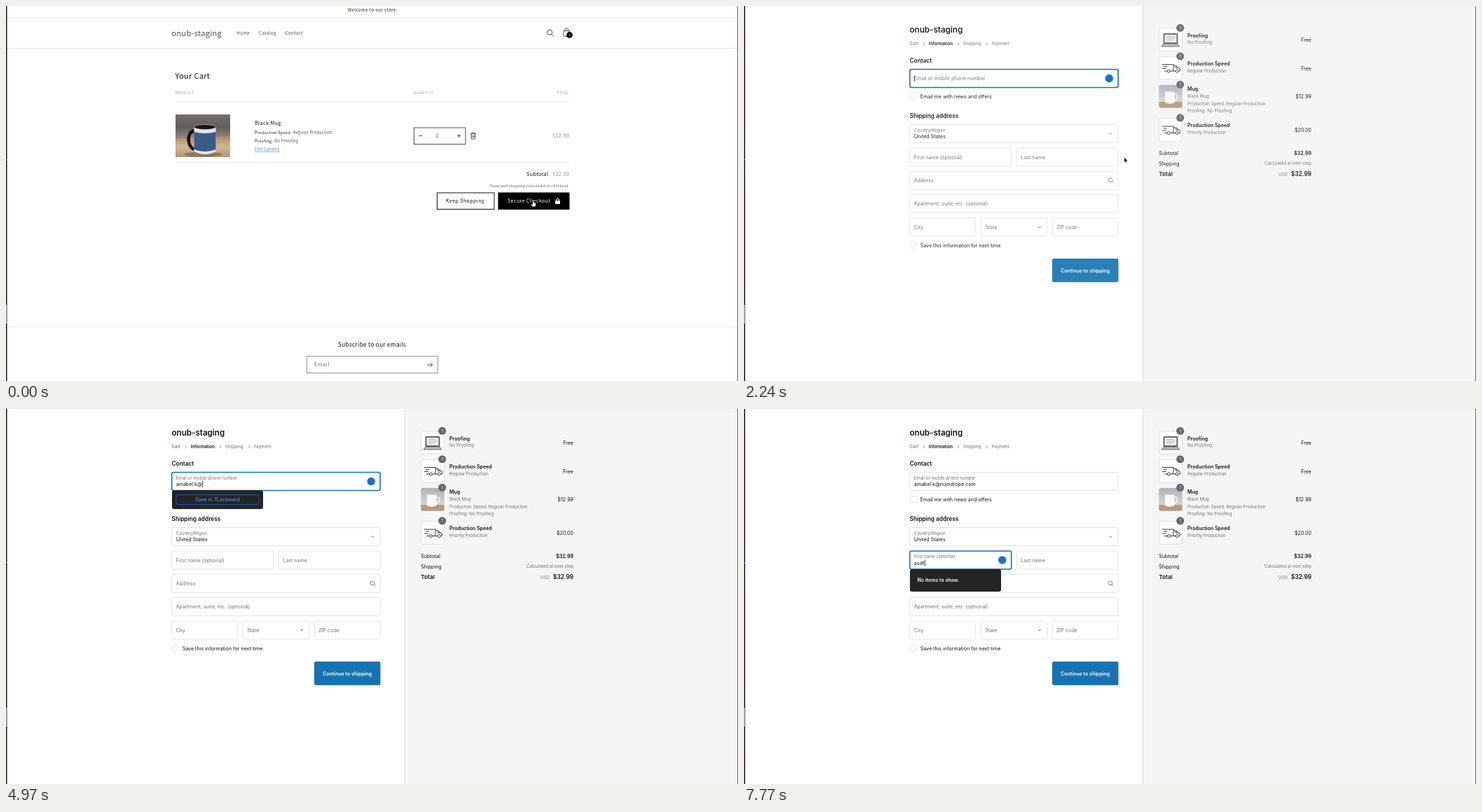
These frames come from a looping animation (1045 px wide and 536 px high, 8000 ms). An HTML page:

```html
<!DOCTYPE html>
<html lang="en">
<head>
<meta charset="utf-8">
<title>Checkout</title>
<style>
  html, body { margin: 0; width: 100%; height: 100%; overflow: hidden; background: #fff; }
  svg { display: block; width: 1045px; height: 536px; }
  text { white-space: pre; }
  #cart { font-family: "Noto Sans CJK JP", "Noto Sans CJK SC", "Noto Sans CJK", "Noto Sans", sans-serif; letter-spacing: .31px; fill: #4d4d4d; }
  #checkout, #popup { font-family: Inter, Roboto, sans-serif; fill: #111; }
  .b { font-weight: 600; }
  .dark { fill: #121212; }
  .grey { fill: #707070; }
  .pale { fill: #8f8f8f; }
  .white { fill: #fff; }
  .link { fill: #1773b0; }
  .button { letter-spacing: .51px; }
  .caps { letter-spacing: .66px; }
  .line { fill: none; stroke: #222; stroke-width: .8; }
  .rule { fill: none; stroke: #e9e9e9; }
  .field { fill: #fff; stroke: #dcdcdc; stroke-width: .8; }
</style>
</head>
<body>
<svg id="stage" viewBox="0 0 1045 536"></svg>
<script>
const SHOP = "onub-staging";
const EMAIL = "amabel.k@numdrope.com";
const EMAIL_KEYS = [3500, 3640, 3710, 3780, 3850, 3920, 4480, 4620, 4970, 5180, 5390,
  5530, 5600, 5740, 5810, 5880, 6020, 6090, 6300, 6370, 6440];
const NAME_KEYS = [7560, 7630, 7700, 7770];
const SWITCH = 2030, LOOP = 8000, STEP = 70;

// Text is placed by the vertical centre of its capitals.
const text = (x, y, size, str, cls = "", attrs = "") =>
  `<text x="${x}" y="${y}" dy=".36em" font-size="${size}" class="${cls}" ${attrs}>${str}</text>`;
const right = (y, size, str, cls) => text(810, y, size, str, cls, 'text-anchor="end"');
const path = (d, cls = "line", attrs = "") => `<path d="${d}" class="${cls}" ${attrs}/>`;
const rect = (x, y, w, h, attrs) => `<rect x="${x}" y="${y}" width="${w}" height="${h}" ${attrs}/>`;
const circle = (x, y, r, attrs) => `<circle cx="${x}" cy="${y}" r="${r}" ${attrs}/>`;

const cartPhoto = rect(242, 155, 78, 61, 'fill="url(#wall)"')
  + path("M242 190L320 186V216H242Z", "", 'fill="url(#wood)"')
  + `<ellipse cx="281" cy="212" rx="27" ry="3.500" fill="#65513c" opacity=".5"/>`
  + path("M271 179C257 175 257 206 272 205", "", 'fill="none" stroke="#111" stroke-width="4.500"')
  + path("M268.500 173V208Q284 216 299.500 208V173Z", "", 'fill="#e3e5e6"')
  + path("M268.500 180Q284 184 299.500 180V205Q284 211 268.500 205Z", "", 'fill="#395b86"')
  + `<ellipse cx="284" cy="173" rx="15.500" ry="3.500" fill="#151515" stroke="#d5d5d5" stroke-width=".6"/>`;

const cart = `<g id="cart">
  ${path("M1 16.500H1044M1 60.500H1044M242 136.500H804M242 223.500H804M1 458.500H1044", "rule")}
  ${text(488, 5.5, 5.95, "Welcome to our store", "dark button")}
  ${text(236.5, 39, 11, SHOP)}
  ${text(329, 38.7, 6.4, "Home")}${text(361, 38.7, 6.4, "Catalog")}${text(398.5, 38.7, 6.4, "Contact")}
  ${circle(776, 37.5, 3.7, 'class="line"')}${path("M778.700 40.200L782 43.600")}
  ${path("M796 35.500H804.500V41.500Q804.500 43.500 802.500 43.500H798Q796 43.500 796 41.500ZM798 35.500V34Q798 31.500 800.250 31.500T802.500 34V35.500")}
  ${circle(804.5, 41.5, 4.4, 'fill="#000"')}${text(803.3, 41.6, 4.6, "1", "white", 'letter-spacing="0"')}
  ${text(241.5, 100.5, 11, "Your Cart", "dark")}
  ${text(241.5, 123.8, 4.9, "PRODUCT", "pale caps")}${text(581.5, 123.8, 4.9, "QUANTITY", "pale caps")}
  ${text(786, 123.8, 4.9, "TOTAL", "pale caps")}
  ${cartPhoto}
  ${text(355, 167.3, 7.33, "Black Mug", "dark")}
  ${text(355, 181.2, 5.5, "Production Speed:", "dark", 'font-weight="500"')}${text(410, 181.2, 5.55, "Regular Production")}
  ${text(355, 193.2, 5.5, "Proofing:", "dark", 'font-weight="500"')}${text(383.3, 193.2, 5.55, "No Proofing")}
  ${text(355, 205.2, 5.55, "Edit Options", "", 'fill="#3a86bd" text-decoration="underline"')}
  ${rect(582.5, 174, 73.5, 23.5, 'class="line"')}
  ${path("M589.500 185.500H594.500M644.200 185.500H649.200M646.700 183V188")}
  ${text(613.4, 185.7, 7.33, "1")}
  ${path("M663 182.800H671M665 182.800V181.300H669V182.800M664 182.800L664.500 190H669.500L670 182.800M666 185V188M668 185V188")}
  ${text(780, 185.5, 7.33, "$12.99", "pale")}
  ${text(743, 240.7, 7.33, "Subtotal", "dark")}${text(780, 240.7, 7.33, "$32.99", "pale")}
  ${text(690, 257, 5.1, "Taxes and shipping calculated at checkout", "", 'font-style="italic"')}
  ${rect(615.5, 267, 81.5, 23.5, 'fill="#fff" stroke="#111"')}${text(628, 279, 6.87, "Keep Shopping", "dark button")}
  ${rect(702.5, 266.5, 102, 24.5, 'fill="#000"')}${text(716, 279, 6.87, "Secure Checkout", "white button")}
  ${rect(784, 278.2, 7, 4.8, 'fill="#fff" rx=".7"')}
  ${path("M785.500 278.500V277.300Q785.500 275.500 787.500 275.500T789.500 277.300V278.500", "", 'fill="none" stroke="#fff" stroke-width="1.100"')}
  ${text(474, 484, 8.24, "Subscribe to our emails", "dark")}
  ${rect(429.5, 500.7, 187, 24, 'class="line" style="stroke:#777"')}
  ${text(440, 512.7, 7.33, "Email", "button", 'fill="#666"')}
  ${path("M601 513H608.700M605.700 510L608.700 513L605.700 516")}
</g>`;

const field = (x, y, w, label = "") =>
  rect(x, y, w, 26, 'rx="2.500" class="field"') + text(x + 6, y + 13.2, 7.1, label, "grey");
const liveField = (id, x, y, w, label) => field(x, y, w)
  + `<g id="${id}" data-y="${y + 13}">${text(x + 6, y + 13.2, 7.1, label, "grey")}${text(x + 6, 0, 6.1, label, "grey")}${text(x + 6, 0, 7.1, "")}</g>`;
const check = (y, label) => rect(237.4, y - 4.6, 8.8, 8.8, 'rx="2" class="field"') + text(251.7, y, 7.1, label);
const chevron = (x, y) => path(`M${x - 2} ${y - 1}l2 2l2 -2`, "line", 'style="stroke:#555"');
const crumb = x => path(`M${x - 1} 52l2 2.200l-2 2.200`, "line", 'style="stroke:#777"');

const laptop = y => `<g transform="translate(609 ${y})" stroke="#555" stroke-width=".8">
  ${rect(-10, -9, 20, 14, 'rx="1" fill="#666"')}${rect(-8.5, -7.5, 17, 11, 'fill="#eee" stroke="none"')}
  ${path("M-6 -5H4M-6 -2.500H6M-6 0H3", "", 'stroke="#c99" fill="none"')}
  ${path("M-10 5.500H10L13 9.500H-13Z", "", 'fill="#bbb"')}</g>`;
const truck = y => `<g transform="translate(609 ${y})" fill="none" stroke="#222" stroke-width=".9">
  ${path("M-12.500 -5H4.500L3.500 4.500H-.500M-10 -2H-5M-12 1H-6M-9 4.500H-5M4.300 -3H8.500L11 0L13.500 1V4.500H11.500M7 4.500H3.500M8 -2.500L7.500 0H11", "")}
  ${circle(-2.7, 4.5, 2, "")}${circle(9.2, 4.5, 2, "")}</g>`;
const mug = () => rect(592.5, 113, 33, 32.5, 'rx="2.500" fill="url(#room)"')
  + path("M592.500 137H625.500V143Q625.500 145.500 623 145.500H595Q592.500 145.500 592.500 143Z", "", 'fill="#b49a7d"')
  + path("M614 126Q619.500 125 618.500 130T613.500 135.500", "", 'fill="none" stroke="#f5f5f5" stroke-width="1.600"')
  + path("M601 122.500H614.500V138Q608 141.500 601 138Z", "", 'fill="#fafafa"');

const item = (top, art, name, detail, price, textY = top + 10.3) =>
  rect(592.5, top, 33, 32.5, 'rx="2.500" fill="#fff" stroke="#d9d9d9" stroke-width=".8"') + art
  + circle(622.7, top - .7, 5.5, 'fill="#666"') + text(622.7, top - .6, 6.1, "1", "white", 'text-anchor="middle"')
  + text(633, textY, 7.05, name, "b") + text(633, textY + 9.8, 6.2, detail, "grey")
  + right(top + 16.7, 7.1, price);

const checkout = `<g id="checkout">
  ${rect(569, 0, 475, 536, 'fill="#f5f5f5"')}${path("M569.200 0V536", "rule", 'style="stroke:#dadada"')}
  ${text(236.5, 33.5, 11.6, SHOP, "b")}
  ${text(236.5, 54.2, 6.13, "Cart", "link")}${text(263.8, 54.2, 6.13, "Information", "b")}
  ${text(312.8, 54.2, 6.13, "Shipping", "grey")}${text(353.4, 54.2, 6.13, "Payment", "grey")}
  ${[257, 306, 346.5].map(crumb).join("")}
  ${text(236.5, 77.8, 8.3, "Contact", "b")}
  ${liveField("email", 236.7, 90.5, 297.5, "Email or mobile phone number")}
  ${check(129.3, "Email me with news and offers")}
  ${text(236.5, 156.8, 8.3, "Shipping address", "b")}
  ${field(236.7, 169.5, 297.5)}
  ${text(242.7, 177.8, 6.1, "Country/Region", "grey")}${text(242.7, 186.9, 7.1, "United States")}
  ${chevron(523.3, 182.5)}
  ${liveField("first", 236.7, 203, 145, "First name (optional)")}
  ${field(389.2, 203, 145, "Last name")}
  ${field(236.7, 236.3, 297.5, "Address")}
  ${circle(523, 248.8, 2.9, 'class="line" style="stroke:#666"')}${path("M525.200 251L527.600 253.400", "line", 'style="stroke:#666"')}
  ${field(236.7, 269.6, 297.5, "Apartment, suite, etc. (optional)")}
  ${field(236.7, 303, 94, "City")}${field(338.2, 303, 94.500, "State")}${field(440.2, 303, 94, "ZIP code")}
  ${chevron(422, 316)}
  ${check(342.2, "Save this information for next time")}
  ${rect(440, 361, 94.5, 33.7, 'rx="2.500" fill="#1773b0"')}
  ${text(487.2, 378, 7, "Continue to shipping", "b white", 'text-anchor="middle"')}
  ${item(32, laptop(48.5), "Proofing", "No Proofing", "Free")}
  ${item(72.5, truck(88.5), "Production Speed", "Regular Production", "Free")}
  ${item(113, mug(), "Mug", "Black Mug", "$12.99", 118.5)}
  ${text(633, 139.7, 6.2, "Production Speed: Regular Production", "grey")}${text(633, 149.5, 6.2, "Proofing: No Proofing", "grey")}
  ${item(160.5, truck(177), "Production Speed", "Priority Production", "$20.00")}
  ${text(592.3, 210.3, 7.1, "Subtotal")}${right(210.3, 7.1, "$32.99", "b")}
  ${text(592.3, 225, 7.1, "Shipping")}${right(225, 6.2, "Calculated at next step", "grey")}
  ${text(592.3, 240, 8.18, "Total", "b")}${text(763, 240.7, 6.1, "USD", "grey")}${right(240, 8.3, "$32.99", "b")}
</g>`;

const $ = id => document.getElementById(id);
$("stage").innerHTML = `<defs>
  <linearGradient id="wall" x2="0" y2="1"><stop stop-color="#77716a"/><stop offset=".3" stop-color="#5e5d5c"/><stop offset=".6" stop-color="#a09183"/></linearGradient>
  <linearGradient id="wood" x2="0" y2="1"><stop stop-color="#a88a6b"/><stop offset=".5" stop-color="#d3b692"/><stop offset="1" stop-color="#b09576"/></linearGradient>
  <linearGradient id="room" x2="0" y2="1"><stop stop-color="#aab2ba"/><stop offset=".7" stop-color="#d3d4d4"/></linearGradient>
  </defs>${cart}${checkout}
  <rect id="ring" rx="2.500" fill="none" stroke="#1773b0" stroke-width="1.600"/>
  <path id="caret" stroke="#000" stroke-width=".8"/>
  <circle id="badge" r="5.700" fill="#1a6fd4"/>
  <g id="popup"><rect id="panel" x="237" width="130" rx="3" fill="#242424"/>
    <g id="empty">${text(247.5, 16, 6.97, "No items to show.", "b white")}</g>
    <g id="save">${rect(243, 6.7, 118, 13.8, 'rx="3" fill="none" stroke="#1d63b5" stroke-width=".9"')}
      ${text(302, 13.5, 7.1, "Save in 7Lockword", "", 'fill="#68a9ee" text-anchor="middle"')}</g></g>
  <g id="pointer" stroke-width=".7">
    <path id="arrow" d="M0 0V7.800L1.800 6.200L3 9L4.300 8.400L3.100 5.700H5.500Z" fill="#000" stroke="#fff"/>
    <path id="hand" d="M-.800 0Q0 -1 .800 0V3L4 4V7L3 9.500H-1L-3.200 6Q-3 4.800 -1.800 5.500L-.800 6Z" fill="#fff" stroke="#000"/>
    <path id="beam" d="M-1.500 -4.500L0 -4L1.500 -4.500M0 -4V4M-1.500 4.500L0 4L1.500 4.500" fill="none" stroke="#222"/></g>
  ${rect(0, 0, 1.5, 536, 'fill="#1b1419"')}${rect(0, 427, 1.2, 27, 'fill="#aaa"')}${rect(0, 219, 1.2, 1.5, 'fill="#888"')}
  ${rect(1044, 0, 1, 536, 'fill="#666"')}`;

const route = [[0, 752.5, 277.5], [140, 752.5, 277.5], [350, 750.5, 277.5], [700, 750.5, 277.5], [840, 749, 277.5],
  [980, 745.5, 277], [1890, 745.5, 277], [1960, 731, 273], [2030, 697, 263], [2100, 654, 250], [2310, 487, 199],
  [2450, 487, 199], [2660, 363, 139], [2800, 338, 116], [3080, 322, 103.5], [LOOP, 322, 103.5]];
// Focus order: start, x, y, width, height
const focus = [[SWITCH, 236.7, 90.5, 297.5, 26], [6650, 237, 124.3, 9.600, 9.600],
  [6930, 236.7, 169.5, 297.5, 26], [7070, 236.7, 203, 145, 26]];

const clamp = v => Math.max(0, Math.min(1, v));
const show = (id, on) => $(id).style.display = on ? "" : "none";
const set = (el, attrs) => { for (const k in attrs) el.setAttribute(k, attrs[k]); };

function pointAt(t) {
  const i = route.findIndex(k => k[0] > t);
  const [t0, x0, y0] = route[i - 1], [t1, x1, y1] = route[i];
  const p = (t - t0) / (t1 - t0);
  return [x0 + (x1 - x0) * p, y0 + (y1 - y0) * p];
}

function typeInto(id, str, keys, t, active) {
  const group = $(id), [placeholder, label, value] = group.children;
  const y = +group.dataset.y, p = clamp((t - keys[0]) / 210);
  const typed = str.slice(0, keys.filter(k => k <= t).length);
  placeholder.style.opacity = typed ? 0 : 1;
  set(label, { y: y - 3.6 - 1.3 * p, opacity: p ** 1.4 });
  const valueY = y + .3 + 3.7 * p;
  set(value, { y: valueY });
  value.textContent = typed;
  if (!active) return;
  const x = 243.2 + (typed ? value.getComputedTextLength() + .3 : 0);
  set($("caret"), { d: `M${x} ${valueY - 4.5}v9` });
}

function draw(t) {
  const fade = clamp((t - SWITCH) / 230);
  show("cart", t < SWITCH);
  show("checkout", t >= SWITCH);
  $("checkout").style.opacity = fade;

  const onEmail = t >= SWITCH && t < 6650, onFirst = t >= 7070;
  typeInto("email", EMAIL, EMAIL_KEYS, t, onEmail);
  typeInto("first", "asdf", NAME_KEYS, t, onFirst);
  const blinkOff = t >= 2520 && t < 2870 || t >= 3360 && t < 3500;
  show("caret", onFirst || onEmail && !blinkOff);
  $("caret").style.opacity = fade;

  const target = focus.filter(f => f[0] <= t).pop();
  show("ring", target);
  if (target) {
    const [, x, y, width, height] = target;
    set($("ring"), { x, y, width, height, opacity: clamp(fade * 2.1) });
  }

  const late = t >= 7210, saving = t >= 3500 && t < 6650;
  show("badge", t >= 2240 && t < 6650 || late);
  set($("badge"), late ? { cx: 368.7, cy: 215.9 } : { cx: 521.3, cy: 103.5 });
  show("popup", t >= 2520 && t < 6650 || late);
  set($("popup"), { transform: `translate(0 ${late ? 228.8 : 116})` });
  set($("panel"), { height: saving ? 27 : 32.2 });
  show("save", saving);
  show("empty", !saving);

  show("pointer", t < 3500);
  set($("pointer"), { transform: `translate(${pointAt(t)})` });
  show("hand", t < 980);
  show("arrow", t >= 980 && t < 2800);
  show("beam", t >= 2800);
}

function tick() {
  const t = performance.now() % LOOP;
  draw(Math.floor(t / STEP) * STEP);
  requestAnimationFrame(tick);
}
tick();
</script>
</body>
</html>
```
